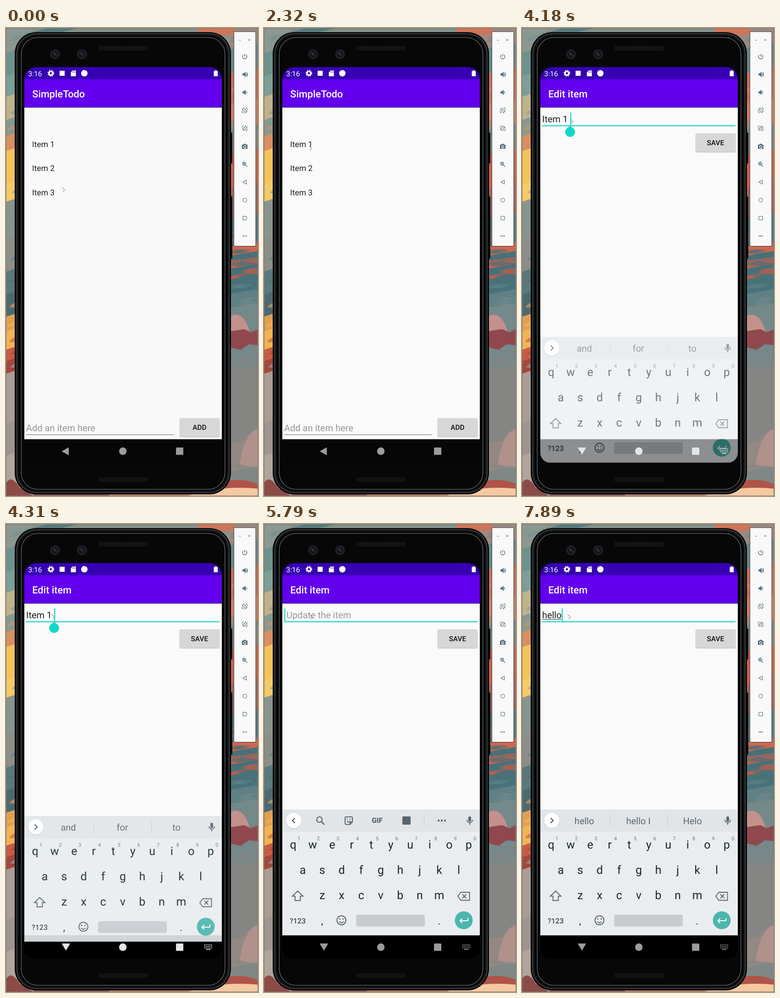
Write an HTML page that moves like this. It is 550 px wide and 1018 px high and loops after 8 s.

```html
<!DOCTYPE html>
<html lang="en">
<head>
<meta charset="utf-8">
<title>Todo app demo</title>
<style>
html, body { margin: 0; width: 100%; height: 100%; overflow: hidden; background: #777; }
svg { display: block; width: 100vw; height: 100vh; }
text { font-family: Roboto, sans-serif; white-space: pre; text-rendering: geometricPrecision; }
</style>
</head>
<body>
<svg id="stage" viewBox="0 0 550 1018" xmlns="http://www.w3.org/2000/svg"></svg>
<script>
const LOOP = 8000;
const TEAL = '#14d8c6';

const rect = (x, y, w, h, fill, more = '') =>
  `<rect x="${x}" y="${y}" width="${w}" height="${h}" fill="${fill}" ${more}/>`;
const circle = (x, y, r, fill, more = '') =>
  `<circle cx="${x}" cy="${y}" r="${r}" fill="${fill}" ${more}/>`;
const path = (d, fill, more = '') => `<path d="${d}" fill="${fill}" ${more}/>`;
const line = (d, color, width = 1.5, more = '') =>
  path(d, 'none', `stroke="${color}" stroke-width="${width}" ${more}`);
const text = (x, y, size, fill, str, more = '') =>
  `<text x="${x}" y="${y}" font-size="${size}" fill="${fill}" ${more}>${str}</text>`;
const group = (x, y, body) => `<g transform="translate(${x} ${y})">${body}</g>`;
const MID = 'text-anchor="middle"';
const BOLD = 'font-weight="500"';

// Painted wallpaper: slanted colour bands with seeded brush strokes
let seed = 7;
const rand = () => (seed = seed * 16807 % 2147483647) / 2147483647;

function bands(x, w, tilt, list) {
  return list.map(([y, color], i) => {
    const next = list[i + 1] || [1018, color];
    let out = path(`M${x} ${y + tilt}L${x + w} ${y - tilt}V1018H${x}Z`, color);
    for (let n = 0; n < 2; n++) {
      const sy = y + (next[0] - y) * (0.6 + rand() * 0.4);
      const sx = x + rand() * w * 0.6;
      out += path(`M${sx} ${sy}q${w * 0.2} ${-tilt - 4} ${w * 0.5} ${-tilt}q${-w * 0.2} ${tilt + 5} ${-w * 0.5} ${tilt}`,
        next[1], 'opacity=".6"');
    }
    return out;
  }).join('');
}

function wallpaper() {
  const left = bands(0, 60, 10, [
    [-20, '#8a9890'], [45, '#6f918d'], [95, '#7d9f98'], [140, '#bdb48e'], [190, '#85998f'],
    [225, '#d99060'], [258, '#f3c45c'], [330, '#f4cb68'], [368, '#87958e'], [450, '#8c8f88'],
    [520, '#5a797c'], [570, '#4b6a70'], [618, '#e0a052'], [650, '#f2b354'], [690, '#c75c42'],
    [715, '#a3463c'], [742, '#a99d95'], [850, '#9f958f'], [920, '#b0a49b']]);
  const right = bands(470, 80, 7, [
    [-20, '#9a8a7f'], [40, '#6a8888'], [95, '#c8705a'], [160, '#d07f63'], [215, '#7c8b87'],
    [270, '#ca624b'], [345, '#a8625a'], [410, '#4f7b81'], [472, '#cf6650'], [492, '#467178'],
    [512, '#c9604b'], [520, '#44717a'], [536, '#bd5e4c'], [543, '#47727a'], [575, '#5f8084'],
    [605, '#74898a'], [700, '#788789'], [740, '#858684'], [900, '#948883'], [960, '#808886']]);
  return left + right +
    path('M486 628Q520 610 534 668H486Z', '#c2918b') +
    path('M486 660L520 655L535 662L550 655V690L530 688L512 700L486 694Z', '#8f494c') +
    path('M510 950Q520 880 550 872V955Z', '#b0928b') +
    path('M0 990Q12 970 30 1000L60 1018H0Z', '#8c4b47') +
    rect(55, 0, 370, 14, '#82908a') + rect(420, 0, 78, 14, '#d1745a') + path('M90 0h70l-40 9h-60z', '#557b7e') +
    rect(60, 1004, 170, 14, '#8f5a52') + rect(225, 1004, 200, 14, '#c9836a') +
    path('M430 1018L480 985Q520 978 550 992V1018Z', '#b0544a') +
    path('M395 1018Q470 994 550 1002V1018Z', '#f6c9a0') +
    line('M0 .5H549.5V1017.5H.5V0', '#777', 1);
}

function grill(y) {
  return [0, 2, 4, 6, 8].map(d =>
    line(`M${202 + d % 4 / 2} ${y + d}H309`, '#34363a', 1, 'stroke-dasharray="1 1"')).join('');
}

function lens(x) {
  return circle(x, 57, 11, '#1a1d21') + circle(x, 57, 7.5, '#101216', 'stroke="#2b3036"') +
    circle(x, 57, 3.2, '#24292f') + circle(x - 2, 55, 1.2, '#59636b') + circle(x + 3, 60, 1, '#3c454c');
}

function phone() {
  return rect(488, 227, 6, 68, '#0c0c0c', 'rx="2"') + rect(488, 366, 6, 136, '#0c0c0c', 'rx="2"') +
    rect(19, 9, 472, 1005.5, '#060606', 'rx="47"') +
    rect(23.5, 12.5, 463.5, 998, '#101112', 'rx="43" stroke="#3b3d40" stroke-width="2.2"') +
    rect(28, 17, 454.5, 989, '#030303', 'rx="40"') +
    rect(33.3, 20.5, 444.5, 983, '#070707', 'rx="36" stroke="#5c5f62" stroke-width="1.5"') +
    lens(107) + lens(166) + grill(40) + grill(978);
}

function sidePanel() {
  const ink = '#4d6c7b';
  const speaker = path('M-5 -2h3l4 -4v12l-4 -4h-3z', ink);
  const turn = line('M2 -6q4 1 4 5M-2 6q-4 -1 -4 -5', ink, 1.1);
  const diamond = line('M-2 -5L5 2L2 5L-5 -2Z', ink, 1.3);
  const icons = [
    line('M-3 -3.5a4.8 4.8 0 1 0 6 0M0 -5.5v5.5', ink, 1.4),
    speaker + line('M3.5 -2.5q2 2.5 0 5M4 -5q4.5 5 0 10', ink, 1.2),
    speaker + line('M3.5 -2.5q2 2.5 0 5', ink, 1.2),
    diamond + turn,
    `<g transform="scale(-1 1)">${diamond + turn}</g>`,
    path('M-6 -3.5h3l1.5 -2h3l1.5 2h3v9h-12z', ink) + circle(0, 1, 2.6, ink, 'stroke="#fff" stroke-width="1.2"'),
    circle(-1.2, -1.2, 3.4, 'none', `stroke="${ink}" stroke-width="1.4"`) +
      line('M1.5 1.5L5.5 5.5M-3 -1.2h3.6M-1.2 -3v3.6', ink, 1.3),
    line('M3.5 -4.3V4.3L-4.2 0Z', ink, 1.1),
    circle(0, 0, 4.2, 'none', `stroke="${ink}" stroke-width="1.1"`),
    rect(-4, -4, 8, 8, 'none', `rx="1" stroke="${ink}" stroke-width="1.1"`),
    [-3.6, 0, 3.6].map(x => circle(x, 0, 1.2, ink)).join('')
  ];
  return rect(497.5, 8, 47.5, 466.5, '#f9f9f9', 'stroke="#3c3c3c"') +
    line('M508.5 26.5h4M529 24l4 4m0 -4l-4 4', '#666', 1) +
    icons.map((icon, i) => group(521, 62 + 39.05 * i, icon)).join('');
}

function bars(title) {
  return rect(40, 85, 431, 27, '#3700b3') + rect(40, 111.5, 431, 61, '#6200ee') +
    rect(40, 172.5, 431, 1.5, '#000', 'opacity=".1"') +
    text(48.5, 104.5, 15.6, '#fff', '3:16') +
    circle(98, 98.5, 4, 'none', 'stroke="#fff" stroke-width="3.2"') +
    circle(98, 98.5, 6.2, 'none', 'stroke="#fff" stroke-width="2" stroke-dasharray="2.6 2.27"') +
    rect(117, 93, 11, 11, '#fff') +
    path('M145.5 92.5h7v12.5h-11v-8.5z', '#fff') +
    line('M145.7 94.5v2.5M148 94.5v2.5M150.3 94.5v2.5', '#3700b3', 1.1) +
    circle(171, 98.5, 7, '#fff') +
    path('M456 92h3.6v1.5h2.4v11.5h-8.5v-11.5h2.5z', '#fff') +
    text(57.3, 151, 21.7, '#fff', title, BOLD);
}

const button = (y, label) =>
  rect(378.5, y + 1, 88, 41, '#000', 'rx="3" opacity=".18"') +
  rect(379, y, 87, 40, '#d6d7d7', 'rx="2"') +
  text(422.4, y + 25.5, 15.4, '#111', label, `${MID} ${BOLD}`);

function home() {
  return rect(40, 173, 431, 722, '#fafafa', 'id="homeBg"') + rect(40, 894.5, 431, 52, '#060606') + bars('SimpleTodo') +
    [1, 2, 3].map(n => text(57, Math.floor(206.5 + 52.5 * n), 17.4, '#1f1f1f', 'Item ' + n)).join('') +
    text(44, 877, 20, '#969696', 'Add an item here') +
    line('M44 884.7H366.5', '#808080', 1.2) + button(848.5, 'ADD');
}

function editor() {
  return rect(40, 173, 431, 722, '#fafafa') + rect(40, 894.5, 431, 52, '#000') + bars('Edit item') +
    text(49, 205, 20, '#999', 'Update the item', 'id="hint"') +
    text(44, 205, 19.9, '#1f1f1f', '', 'id="field"') +
    line('', '#222', 1.1, 'id="composing"') +
    line('M44 212.7H466', '#808080', 1.2, 'id="rule"') + button(229, 'SAVE') +
    rect(0, 183.5, 2.2, 28, TEAL, 'id="caret"') +
    path('M105 213l7.5 5.5a10.7 10.7 0 1 1 -15 0z', TEAL, 'id="handle"');
}

function keyRow(keys, x, y) {
  return [...keys].map((k, i) => text(x + 42.57 * i, y, 25, '#17262e', k, MID)).join('');
}

function keyboard() {
  const ink = '#59666e';
  const digits = [...'1234567890'].map((d, i) => text(76 + 42.7 * i, 688, 11, '#6b777e', d, MID)).join('');
  const words = [0, 1, 2].map(i => text(136 + 118 * i, 653, 20, '#5b666e', '', `${MID} id="word${i}"`)).join('');
  const mic = rect(-3, -9, 6, 11.5, ink, 'rx="3"') + line('M-6.2 -1.5a6.2 6.2 0 0 0 12.4 0M0 4.5v5', ink, 2);
  const tools = circle(121, 643, 6, 'none', `stroke="${ink}" stroke-width="2.2"`) + line('M125.5 647.5L131.5 654', ink, 2.6) +
    line('M179 637h12a2 2 0 0 1 2 2v9l-5 5.5h-9a2 2 0 0 1 -2 -2v-12.5a2 2 0 0 1 2 -2zM193 648h-5v5M181 646q3.5 5 7 0', ink, 2) +
    circle(181.8, 642, 1.2, ink) + circle(188.2, 642, 1.2, ink) +
    text(247, 650.3, 15.5, ink, 'GIF', `${MID} font-weight="900"`) +
    rect(302, 636, 18, 18, ink, 'rx="2"') + line('M349.5 632V658', '#c5cace', 1) +
    [381, 388, 395].map(x => circle(x, 645, 2.2, ink)).join('');
  return rect(40, 621, 431, 273.5, '#e9edf0') + rect(40, 621, 431, 48.5, '#e1e5e8') +
    circle(65, 646, 17, '#b9bfc4', 'opacity=".6"') + circle(65, 645, 16.5, '#fff') +
    line('', '#4c585f', 2.2, 'id="chevron"') +
    `<g id="words">${words}${line('M192.5 632V658M317.5 632V658', '#c5cace', 1)}</g><g id="tools">${tools}</g>` +
    group(449, 645, mic) +
    keyRow('qwertyuiop', 63.7, 706) + digits + keyRow('asdfghjkl', 84.5, 761) + keyRow('zxcvbnm', 127, 816) +
    line('M73.5 798.5L85 809.5H79.3V819H67.7V809.5H62Z', ink, 2) +
    line('M429.5 801H448.5V818.5H429.5L423 809.7ZM433 805.5l8.5 8.5m0 -8.5l-8.5 8.5', ink, 1.9) +
    text(73.5, 868.5, 16, '#3d4a52', '?123', `${MID} ${BOLD}`) +
    text(127, 871, 22, '#17262e', ',', MID) + text(382.5, 871, 22, '#17262e', '.', MID) +
    circle(169, 862, 9.8, 'none', `stroke="${ink}" stroke-width="2"`) +
    circle(165.5, 859, 1.5, ink) + circle(172.5, 859, 1.5, ink) + line('M164 864.5q5 6 10 0', ink, 1.9) +
    rect(201, 850, 150, 25.5, '#c8ccd0', 'rx="4"') +
    circle(436, 862, 19.5, '#4cb6ac') + line('M445 857V863H428M432.5 858L427.5 863L432.5 868', '#fff', 2);
}

function navIcons() {
  const dots = [0, 1, 2, 3].map(r =>
    line(`M${r < 3 ? 433 : 436.5} ${915.5 + 3.3 * r}H${r < 3 ? 450 : 446.5}`, 'currentColor', 1.8,
      r < 3 ? 'stroke-dasharray="2 1.7"' : '')).join('');
  return path('M137 912V929.5L121.5 920.8Z', 'currentColor', 'id="back"') +
    path('M121.5 912.5H140L130.8 928Z', 'currentColor', 'id="down"') +
    circle(255, 920.5, 8.2, 'currentColor') + rect(371, 912.5, 16, 16, 'currentColor', 'rx="1.5"') +
    `<g id="imeIcon">${dots}</g>`;
}

document.getElementById('stage').innerHTML =
  `<defs><clipPath id="screen">${path('M40 946V111a26 26 0 0 1 26 -26H445a26 26 0 0 1 26 26V924a22 22 0 0 1 -22 22H62a22 22 0 0 1 -22 -22Z', '#000')}</clipPath>
  <clipPath id="reveal">${rect(40, 85, 431, 862, '#000', 'id="revealBox"')}</clipPath></defs>` +
  wallpaper() + phone() + sidePanel() +
  `<g clip-path="url(#screen)"><g id="home">${home()}</g>
  <g clip-path="url(#reveal)"><g id="edit">${editor()}</g></g>
  <g id="keys">${keyboard()}</g><g id="nav">${navIcons()}</g></g>` +
  `<g id="pointer">${line('M.5 .5L7.5 7.5', '#4a4a4a', 0.9)}${line('M2.5 7.8L4.5 11M3 8.2H5.5', '#8c8c8c', 0.9)}</g>`;

const el = {};
document.querySelectorAll('[id]').forEach(e => el[e.id] = e);
const show = (e, on) => e.setAttribute('display', on ? 'inline' : 'none');

// Timed steps: [start, ...values]
const moves = [
  [0, 122, 346], [440, 128, 322], [590, 133, 282], [730, 134, 248], [880, 121, 232], [1030, 106, 243], [1170, 98, 256],
  [3060, 101, 229], [3210, 104, 215], [3360, 105, 204], [3500, 105, 197], [4310, 99, 196]];
const slides = [[0, 273, 0], [4050, 105, 0.25], [4180, 51, 0.6], [4310, 14, 0.9], [4460, 0, 1]];
const edits = [
  [0, 'Item 1 ', 'and for to'], [4910, 'Item ', 'and for to'], [5050, 'Item', 'Item Items Itemized'],
  [5190, 'Ite', 'Item Items Itemized'], [5350, 'It', "It It's Its"], [5500, 'I', "I I'm I'll"],
  [5640, '', "I I'm I'll"], [5790, '', ''],
  [7290, 'h', 'he have her'], [7440, 'he', 'he her here'], [7590, 'hel', 'help hello held'],
  [7740, 'hell', 'hell hello Hello'], [7890, 'hello', 'hello hello_I Helo']];
const at = (list, t) => list.filter(s => s[0] <= t).pop();
const within = (t, a, b) => t >= a && t < b;

function draw(t) {
  const [, px, py] = at(moves, t);
  el.pointer.setAttribute('transform', `translate(${px} ${py})`);

  const opening = within(t, 2470, 2620);
  show(el.home, t < 2620);
  show(el.edit, t >= 2470);
  el.homeBg.setAttribute('fill', t < 2320 ? '#f9f9f9' : '#fafafa');
  el.edit.setAttribute('transform', `translate(0 ${opening ? 14 : 0})`);
  el.revealBox.setAttribute('y', opening ? 260 : 85);

  const [, str, sug] = at(edits, t);
  el.field.textContent = str;
  show(el.hint, !str);
  const end = 44 + (str ? el.field.getComputedTextLength() : 0);
  const typing = t >= 4910 && str && !str.endsWith(' ');
  el.composing.setAttribute('d', typing ? `M44.5 207.3H${end}` : '');
  const focus = t >= 3650;
  el.rule.setAttribute('stroke', focus ? TEAL : '#808080');
  el.rule.setAttribute('stroke-width', focus ? 2.3 : 1.2);
  el.caret.setAttribute('x', end + 0.2);
  show(el.caret, t >= 3920 && !within(t, 6080, 6670) && !within(t, 7140, 7290));
  show(el.handle, within(t, 3920, 4910));

  const [, drop, alpha] = at(slides, t);
  show(el.keys, alpha > 0);
  el.keys.setAttribute('transform', `translate(0 ${drop})`);
  el.keys.setAttribute('opacity', alpha);
  show(el.words, sug);
  show(el.tools, !sug);
  sug.split(' ').forEach((w, i) => el['word' + i].textContent = w.replace('_', ' '));
  el.chevron.setAttribute('d', sug ? 'M62.5 639.5L68 645L62.5 650.5' : 'M67.5 639.5L62 645L67.5 650.5');

  const ime = alpha > 0;
  show(el.back, !ime);
  show(el.down, ime);
  show(el.imeIcon, ime);
  el.nav.setAttribute('color', ime && alpha < 1 ? '#e4e5e6' : '#9b9b9b');
}

function tick() {
  draw(performance.now() % LOOP);
  requestAnimationFrame(tick);
}
tick();
</script>
</body>
</html>
```
